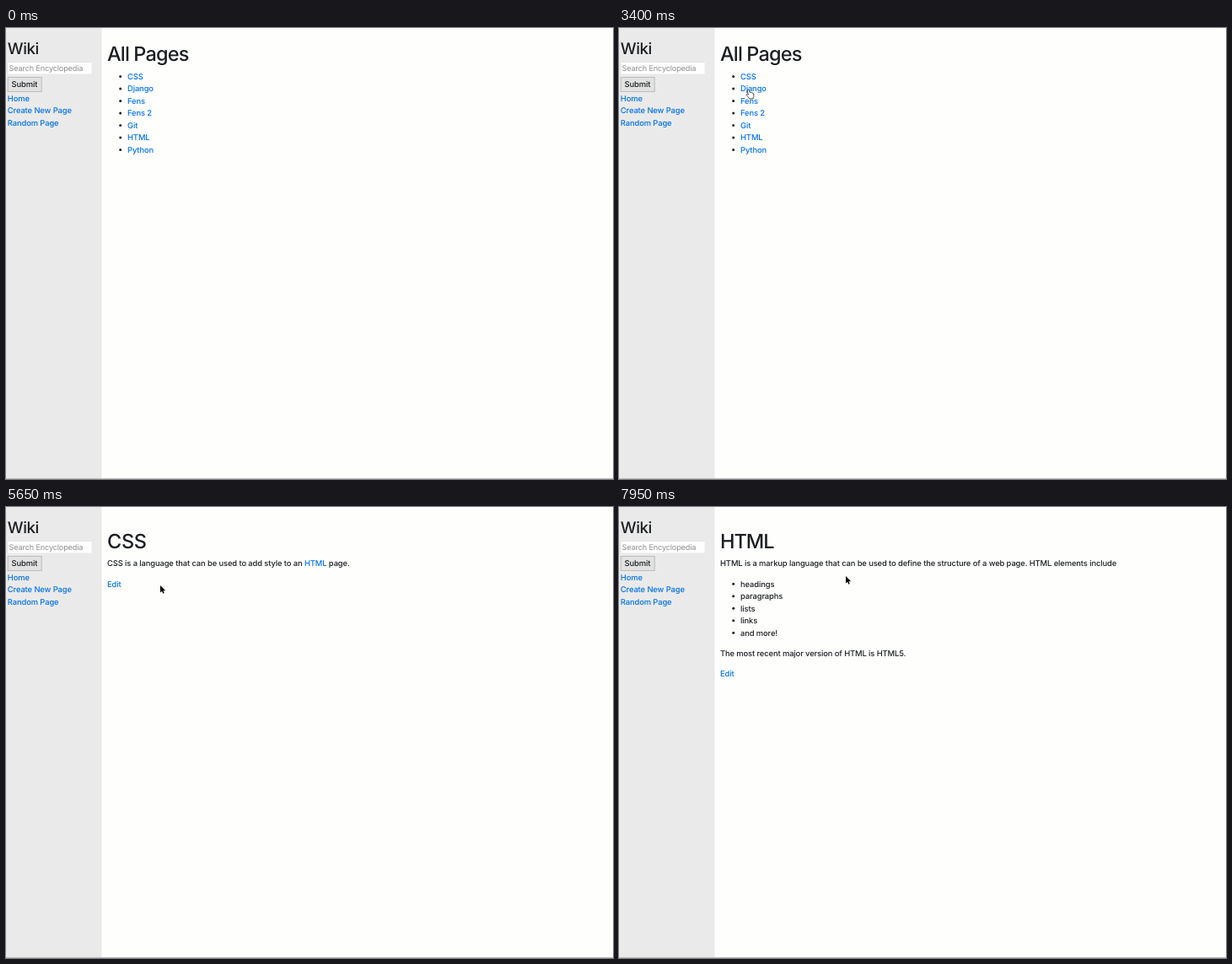
An HTML page for the animation above (8 s loop, 720 by 535 pixels).

```html
<!DOCTYPE html>
<html lang="en">
<head>
<meta charset="utf-8">
<title>Wiki</title>
<style>
  html, body { margin: 0; width: 100%; height: 100%; overflow: hidden; background: #fefefd; }
  svg { display: block; }
  text {
    font: 500 9.4px Inter, "Liberation Sans", sans-serif;
    font-optical-sizing: none;
    letter-spacing: -0.11px;
    text-rendering: geometricPrecision;
    fill: #1b1e21;
    white-space: pre;
  }
  .h1 { font-size: 23.5px; letter-spacing: -0.85px; }
  .h2 { font-size: 18.75px; letter-spacing: -0.45px; }
  .hint { font-size: 9.1px; font-weight: 400; letter-spacing: -0.13px; fill: #8e8e8e; }
  .link { fill: #0072ea; }
</style>
</head>
<body>
<svg id="stage" width="720" height="535" viewBox="0 0 720 535">
  <rect width="720" height="535" fill="#fefefd"/>
  <rect width="113.5" height="535" fill="#eaeaea"/>
  <rect x="2" y="40.5" width="99.5" height="14" fill="#fefefe"/>
  <path d="M2 54.5V40.5H101.5" fill="none" stroke="#dcdcdc" stroke-width=".6"/>
  <rect x="2.2" y="58.5" width="40" height="17" fill="#e2e2e2" stroke="#bdbdbb" stroke-width="1"/>
  <g id="side"></g>
  <g id="pages"></g>
  <rect y="534" width="720" height="1" fill="#bcbcbc"/>
  <g id="cursor">
    <path id="arrow" d="M0 0V8.6L2 6.8L3.3 9.7L4.7 9.1L3.5 6.3H6.2Z" fill="#000" stroke="#fff" stroke-width=".7" paint-order="stroke"/>
    <path id="hand" d="M-1 0.4Q0 -1 1 0.4L1.9 3.2Q2.9 2.5 3.5 3.4Q4.5 2.9 5 3.9Q6.2 3.7 6.4 5L6.7 7.2Q6.7 8.6 5.9 9.6V10.6H1.4L-0.2 8.4L-2.2 6Q-2 4.7 -0.6 5.4L0.1 6Z" fill="#fff" stroke="#222" stroke-width=".8" stroke-linejoin="round"/>
    <path id="beam" d="M-2 -4.7Q0 -4.7 0 -3.4Q0 -4.7 2 -4.7M0 -3.6V3.6M-2 4.7Q0 4.7 0 3.4Q0 4.7 2 4.7M-1 1.4H1" fill="none" stroke="#222" stroke-width=".9"/>
  </g>
</svg>
<script>
const LOOP = 8000, TICK = 50, LINE = 14.5, LEFT = 120, INDENT = 144;
const $ = id => document.getElementById(id);

function add(parent, tag, attrs, content = "") {
  const el = document.createElementNS("http://www.w3.org/2000/svg", tag);
  for (const key in attrs) el.setAttribute(key, attrs[key]);
  el.textContent = content;
  parent.append(el);
  return el;
}

const write = (parent, x, y, content, cls = "") =>
  add(parent, "text", { x, y, class: cls }, content);

function list(parent, top, items, cls) {
  items.forEach((item, i) => {
    const y = top + i * LINE;
    add(parent, "circle", { cx: 135.7, cy: y - 3.3, r: 1.5, fill: "#1b1e21" });
    write(parent, INDENT, y, item, cls);
  });
}

function page(title, y, spacing) {
  const g = add($("pages"), "g", {});
  write(g, LEFT, y, title, "h1").style.letterSpacing = spacing + "px";
  return g;
}

// Sidebar
write($("side"), 1.8, 31.4, "Wiki", "h2");
write($("side"), 3.6, 51.4, "Search Encyclopedia", "hint");
write($("side"), 6.6, 70.2, "Submit");
["Home", "Create New Page", "Random Page"].forEach((label, i) =>
  write($("side"), 1.8, 86.9 + i * LINE, label, "link"));

// Pages
const index = page("All Pages", 39.4, -0.85);
list(index, 60.7, ["CSS", "Django", "Fens", "Fens 2", "Git", "HTML", "Python"], "link");

const css = page("CSS", 49.1, -0.3);
const line = write(css, LEFT, 70.4, "CSS is a language that can be used to add style to an ");
add(line, "tspan", { class: "link" }, "HTML");
add(line, "tspan", {}, " page.");
write(css, LEFT, 94.6, "Edit", "link");

const html = page("HTML", 49.1, -1);
write(html, LEFT, 70.4, "HTML is a markup language that can be used to define the structure of a web page. HTML elements include");
list(html, 94.6, ["headings", "paragraphs", "lists", "links", "and more!"]);
write(html, LEFT, 177, "The most recent major version of HTML is HTML5.");
write(html, LEFT, 201.1, "Edit", "link");

const views = [[0, index], [3950, css], [7050, html]];

// Pointer: time, x, y, shape from that time on
const path = [
  [0, 385, 486, "none"], [50, 385, 486, "arrow"], [400, 379, 450, "arrow"],
  [850, 357, 341, "arrow"], [1150, 346, 165, "arrow"], [1350, 108, 104, "arrow"],
  [1500, 108, 104, "arrow"], [1550, 98, 101, "arrow"], [1700, 98, 101, "arrow"],
  [2100, 30, 84, "hand"], [2300, 23.4, 80.5, "hand"], [2650, 23.4, 80.5, "hand"],
  [2750, 32, 82, "arrow"], [3250, 143, 84, "hand"], [3500, 160, 66, "hand"],
  [3700, 156, 57, "hand"], [3950, 156, 57, "arrow"], [4450, 156, 57, "arrow"],
  [4700, 162, 66, "beam"], [4950, 170, 77, "arrow"], [5300, 178, 91, "arrow"],
  [5650, 183, 93, "arrow"], [5850, 235, 89, "arrow"], [6150, 358, 77, "arrow"],
  [6200, 368, 75, "beam"], [6400, 420, 73, "beam"], [6650, 385, 72, "beam"],
  [6750, 376, 69, "hand"], [6900, 368, 67, "hand"], [7050, 368, 67, "beam"],
  [7450, 368, 67, "beam"], [7600, 345, 73, "beam"], [7700, 318, 77, "arrow"],
  [7950, 269, 82, "arrow"], [8000, 269, 82, "arrow"]
];

const lastBefore = (rows, t) => rows.findLastIndex(row => row[0] <= t);

function draw(t) {
  const view = lastBefore(views, t);
  views.forEach(([, g], i) => g.setAttribute("display", i === view ? "inline" : "none"));

  const i = lastBefore(path, t);
  const [t0, x0, y0, shape] = path[i];
  const [t1, x1, y1] = path[i + 1];
  const k = (t - t0) / (t1 - t0);
  $("cursor").setAttribute("transform", `translate(${x0 + (x1 - x0) * k} ${y0 + (y1 - y0) * k})`);
  for (const id of ["arrow", "hand", "beam"])
    $(id).setAttribute("display", id === shape ? "inline" : "none");
}

const start = performance.now();
function frame() {
  const t = (performance.now() - start) % LOOP;
  draw(Math.floor(t / TICK) * TICK);
  requestAnimationFrame(frame);
}
frame();
</script>
</body>
</html>
```
